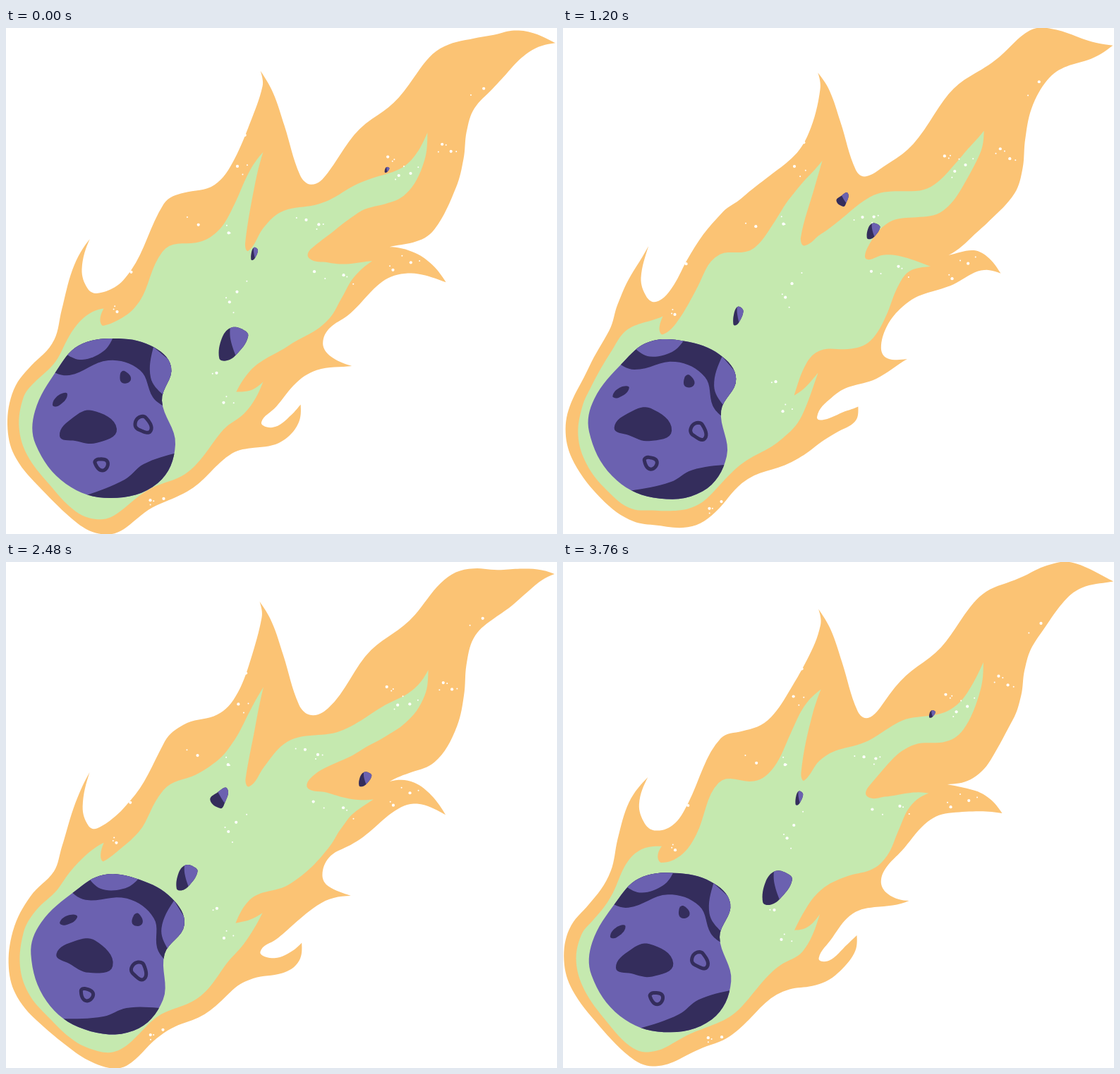
An HTML page with a canvas for the animation above (3840 ms loop, 781 px wide and 717 px high).

```html
<!DOCTYPE html>
<html>
<head>
<meta charset="utf-8">
<style>
html, body { margin: 0; width: 100%; height: 100%; overflow: hidden; background: #fff; }
canvas { display: block; }
</style>
</head>
<body>
<canvas id="stage" width="781" height="717"></canvas>
<script>
const ctx = document.getElementById("stage").getContext("2d");
const ORANGE = "#fbc374", GREEN = "#c5e9af", LILAC = "#6b61b0", DARK = "#342d5c";
const STEP = 80, FRAMES = 48, CYCLE = 6, TAU = 2 * Math.PI;

// "x,y" pairs; a leading * marks a sharp corner
const parse = text => text.split(" ").map(word => {
  const [x, y] = word.replace("*", "").split(",").map(Number);
  return { x, y, corner: word[0] === "*" };
});
const mix = (p, q, t) => ({ x: p.x + (q.x - p.x) * t, y: p.y + (q.y - p.y) * t });

// Samples a smooth closed curve through the key points
function smooth(text, samples = 8) {
  const keys = parse(text), n = keys.length, at = i => keys[(i + n) % n];
  const control = (i, reach) => {
    const p = at(i), dx = at(i + 1).x - at(i - 1).x, dy = at(i + 1).y - at(i - 1).y;
    const k = p.corner ? 0 : reach / Math.hypot(dx, dy);
    return { x: p.x + dx * k, y: p.y + dy * k };
  };
  return keys.flatMap((p, i) => {
    const q = at(i + 1), reach = 0.36 * Math.hypot(q.x - p.x, q.y - p.y);
    let a = control(i, reach), b = control(i + 1, -reach);
    if (p.corner) a = mix(p, b, 0.5);
    else if (q.corner) b = mix(q, a, 0.5);
    return Array.from({ length: samples }, (_, j) => {
      const t = j / samples, m = mix(a, b, t);
      return mix(mix(mix(p, a, t), m, t), mix(m, mix(b, q, t), t), t);
    });
  });
}

function trace(points) {
  ctx.beginPath();
  points.forEach(p => ctx.lineTo(p.x, p.y));
  ctx.closePath();
}

function fill(points, color) {
  trace(points);
  ctx.fillStyle = color;
  ctx.fill();
}

// Wave running along the flame, swaying it crosswise
const wave = step => ({ x, y }) => {
  const sway = 6.3 * Math.cos(TAU * (step / CYCLE - (x - y / 4 - 243) / 143));
  return { x: x + sway / 4, y: y + sway };
};

const outer = smooth(
  "*779,23 742,40 715,56 688,80 664,114 654,152 650,192 639,230 606,279 576,302 *545,316 580,317 603,330 " +
  "*622,354 589,347 552,357 518,374 483,401 459,424 450,450 459,466 *489,474 442,491 408,507 382,530 361,555 376,560 404,545 " +
  "*418,535 414,559 390,579 352,596 322,609 255,651 215,681 170,708 135,711 100,700 52,660 15,613 3,571 10,525 36,480 67,435 78,396 95,347 " +
  "*120,304 109,348 117,375 130,382 154,368 176,337 225,255 253,237 294,216 324,185 347,142 364,85 " +
  "*361,62 378,90 394,136 416,205 431,216 455,201 519,131 578,69 617,35 663,9 700,5 728,8");

const inner = smooth(
  "*597,147 592,183 566,231 538,254 500,265 464,281 432,312 430,327 455,327 490,330 " +
  "*520,334 492,349 475,375 458,410 435,437 403,452 366,463 346,480 *327,518 345,511 " +
  "*363,495 338,548 310,575 282,602 252,626 217,650 189,670 160,685 133,690 98,683 61,650 32,612 20,572 26,530 40,505 69,466 89,433 110,415 " +
  "*140,403 135,420 140,428 165,411 188,381 222,319 270,308 298,284 323,245 344,210 " +
  "*366,182 355,222 338,301 343,312 365,288 395,264 437,245 477,232 520,219 557,196 581,171");

let seed = 7;
const random = () => (seed = seed * 16807 % 2147483647) / 2147483647;
const scatter = () => (random() - 0.5) * 34;

// Each large dot comes with a few fine ones nearby
const specks = parse(
  "676,81 632,180 619,168 541,182 572,200 556,206 442,273 425,270 437,345 477,344 550,349 574,333 " +
  "340,157 328,196 273,280 314,284 326,368 316,385 176,340 158,404 300,495 310,537 224,669 206,675"
).flatMap(({ x, y }, i) => [
  { x, y, r: 2.1 },
  ...Array.from({ length: 1 + i % 2 }, () => ({ x: x + scatter(), y: y + scatter(), r: 1 }))
]);

const body = smooth("72,485 103,450 153,440 205,450 234,480 221,528 240,590 215,645 148,666 85,646 42,590 41,543");
const shades = [
  "*60,484 90,492 145,471 190,485 208,523 *224,536 *260,500 *230,420 *80,420",
  "*114,662 168,640 195,618 *242,602 *260,690 *116,690"
].map(s => smooth(s));
const patches = ["*85,462 108,470 138,458 *152,438 *100,425", "*209,452 205,495 *223,520 *255,490"].map(s => smooth(s));
const craters = [
  "76,578 95,552 122,542 157,568 128,588 98,585",
  "162,490 168,486 177,498 165,503",
  "66,534 75,520 87,519 75,535"
].map(s => smooth(s));
const rings = ["183,562 188,552 198,552 205,571 188,569", "126,616 131,611 144,615 137,627"].map(s => smooth(s));

const egg = {
  outline: smooth("-8,-49 25,-46 45,-24 8,33 -22,50 -42,42 -34,-18"),
  light: smooth("*-8,-60 -8,-15 *14,50 *70,20 *60,-70")
};
const drop = {
  outline: smooth("40,-49 25,30 6,49 -44,8 -10,-28"),
  light: smooth("*-10,-40 12,0 *32,30 *70,10 *50,-70")
};
// Place and speed at age 0; shrinks from full size at one age to nothing at another
const pebbles = [
  { x: 352, y: 320, vx: 17.3, vy: -14.7, size: 28, full: -10, gone: 8, shape: egg, width: 0.62 },
  { x: 540, y: 201, vx: 16.7, vy: -14.5, size: 36, full: -18, gone: 3, shape: egg, width: 0.95 },
  { x: 322, y: 448, vx: 18.7, vy: -14, size: 48, full: -2, gone: 14.7, shape: egg, width: 1 },
  { x: 114, y: 518, vx: 18.8, vy: -18.3, size: 34, full: 3, gone: 22.5, shape: drop, width: 1 }
];
const bursts = [0, 21, 48];

function drawPebble(p, age) {
  if (age < p.full - 4 || age >= p.gone) return;
  const scale = p.size / 100 * Math.cos(TAU / 4 * (age - p.full) / (p.gone - p.full));
  ctx.save();
  ctx.translate(p.x + p.vx * age, p.y + p.vy * age);
  ctx.scale(scale * p.width, scale);
  fill(p.shape.outline, DARK);
  ctx.clip();
  fill(p.shape.light, LILAC);
  ctx.restore();
}

function drawRock(step) {
  const phase = (step + CYCLE - 1) % CYCLE / (CYCLE - 1);
  ctx.save();
  ctx.translate(141, 553);
  ctx.rotate(19 * (1 - phase) ** 1.25 * Math.PI / 180);
  ctx.translate(-141, -553);
  fill(body, LILAC);
  ctx.clip();
  shades.forEach(s => fill(s, DARK));
  patches.forEach(s => fill(s, LILAC));
  craters.forEach(s => fill(s, DARK));
  ctx.strokeStyle = DARK;
  ctx.lineWidth = 5;
  rings.forEach(s => { trace(s); ctx.stroke(); });
  ctx.restore();
}

function draw() {
  const frame = Math.floor(performance.now() / STEP) % FRAMES, step = frame % CYCLE;
  const sway = wave(step);
  ctx.fillStyle = "#fff";
  ctx.fillRect(0, 0, 781, 717);
  fill(outer.map(sway), ORANGE);
  fill(inner.map(sway), GREEN);
  ctx.fillStyle = "#fff";
  for (const dot of specks) {
    const { x, y } = sway(dot);
    ctx.beginPath();
    ctx.arc(x, y, dot.r, 0, TAU);
    ctx.fill();
  }
  for (const start of bursts) pebbles.forEach(p => drawPebble(p, frame - start));
  drawRock(step);
  requestAnimationFrame(draw);
}
draw();
</script>
</body>
</html>
```
